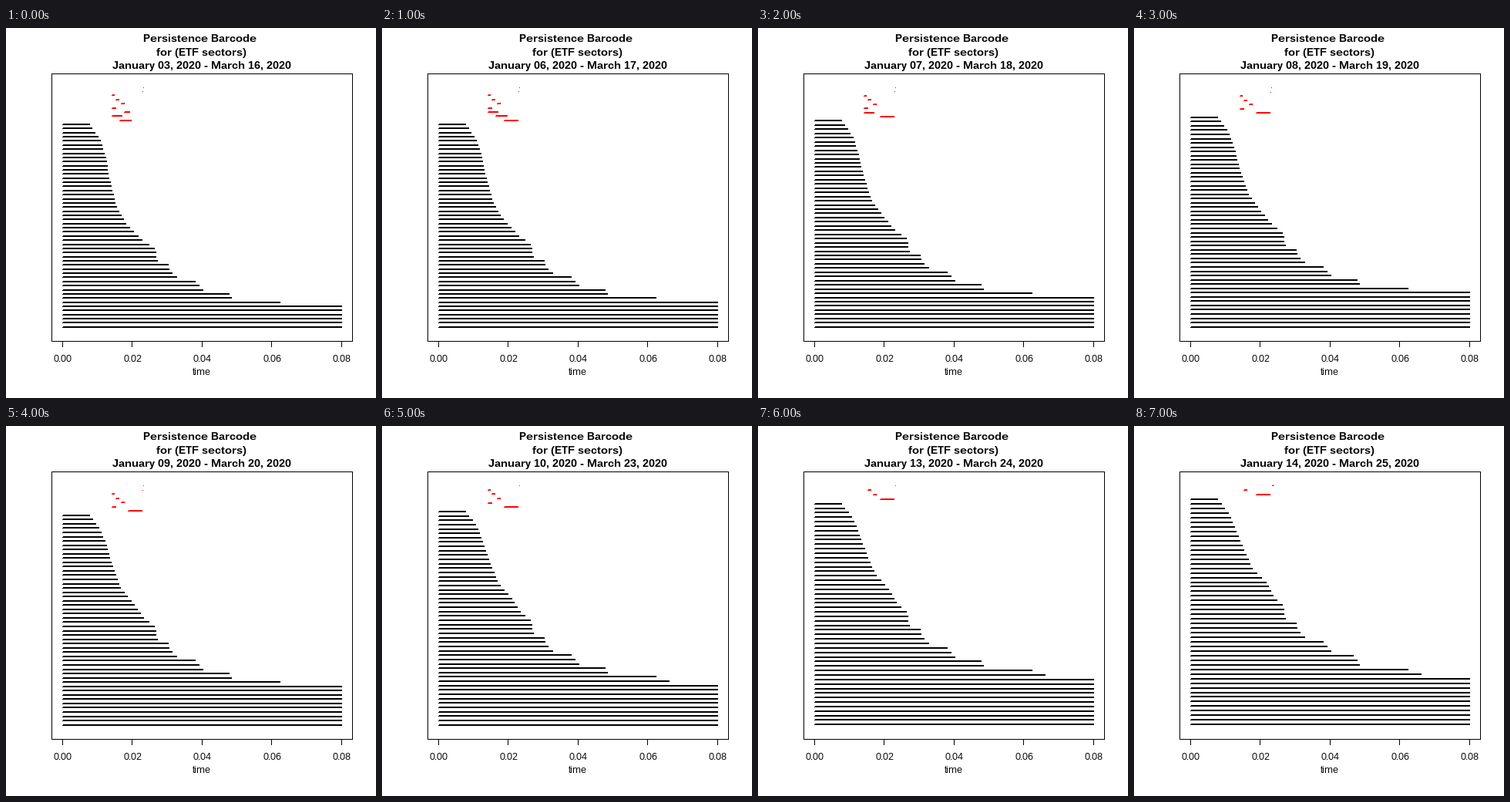
Write a matplotlib script that moves like this. It is 480x480 px and loops after 8000 ms.

```python
import numpy as np
import matplotlib.pyplot as plt
from matplotlib.animation import FuncAnimation
from matplotlib.collections import PolyCollection
from matplotlib.patches import Rectangle

SIZE = 480
PX = 0.75                      # points per pixel at 96 dpi
STEPS = 8
LEFT, RIGHT = 73, 436          # extent of a full-length bar
Y_ZERO, Y_SPAN = 393.69, 321.78
COMPONENTS = 50

plt.rcParams.update({
    "font.family": "Liberation Sans",
    "text.hinting": "native",
    "text.hinting_factor": 1,
})

# Evenly spaced quantiles of the short bars' right ends, first and last window.
SHORT_START = np.array([109, 123, 130, 133, 138, 144, 156, 177])
SHORT_STOP = np.array([109, 123, 131, 138, 146, 154, 172, 181])

# Right ends of the long bars, and of those that join at a later step.
LONG = [186, 193, 195, 195, 197, 211, 212, 216, 222,
        246, 251, 256, 290, 293, 356]
LATE = {373: 5, 285: 7}

# Loops from bottom to top: left, right, first step, last step.
LOOPS = [
    (158, 177, 1, 7), (147, 163, 0, 1), (137, 151, 0, 2), (153, 161, 0, 0),
    (137, 143, 0, 5), (149, 154, 0, 6), (142, 147, 0, 7), (137, 141, 0, 5),
    (179, 181, 7, 7), (177, 178, 0, 4), (178, 179, 0, 6),
]


def component_spans(step):
    """Bars from longest to shortest; short ones give way to full ones."""
    full = min(6 + step, 8 + step // 2)
    long = LONG + [end for end, first in LATE.items() if step >= first]
    count = COMPONENTS - full - len(long)
    keys = SHORT_START + (SHORT_STOP - SHORT_START) * step / (STEPS - 1)
    rank = np.linspace(0, len(keys) - 1, count)
    short = np.interp(rank, np.arange(len(keys)), keys).round()
    ends = [RIGHT] * full + long + list(short)
    return [(LEFT, end) for end in sorted(ends, reverse=True)]


def loop_spans(step):
    return [(x0, x1) for x0, x1, first, last in LOOPS if first <= step <= last]


def bar(x0, x1, y):
    """Two-pixel bar whose lower row starts one pixel further left."""
    return [(x0 + 1, y - 1), (x1, y - 1), (x1, y + 1),
            (x0, y + 1), (x0, y), (x0 + 1, y)]


fig = plt.figure(figsize=(5, 5), dpi=96, facecolor="white")
ax = fig.add_axes([0, 0, 1, 1])
ax.set_xlim(0, SIZE)
ax.set_ylim(SIZE, 0)
ax.axis("off")


def block(x, y, w, h):
    ax.add_patch(Rectangle((x, y), w, h, fc="black", lw=0, antialiased=False))


def label(x, y, text, px=12, weight="normal"):
    return ax.text(x, y, text, fontsize=px * PX, weight=weight,
                   ha="center", va="baseline", color="black")


# Plot frame, ticks and axis labels
for y in (59, 406):
    block(59, y, 391, 1)
for x in (59, 449):
    block(x, 59, 1, 348)
for i in range(5):
    x = 73.5 + 90.45 * i
    block(int(x), 406, 1, 8)
    label(x + 0.5, 433, f"{i * 0.02:.2f}")
label(254, 450, "time")

label(251.5, 18, "Persistence Barcode", 14, "bold")
label(253.5, 36, "for (ETF sectors)", 14, "bold")
dates = label(254, 53, "", 14, "bold")

bars = PolyCollection([], linewidths=0, antialiaseds=False)
ax.add_collection(bars, autolim=False)


def trading_day(first, step):
    """Two-digit day of the month, counting weekdays only."""
    return str(np.busday_offset(first, step))[-2:]


def update(step):
    start = trading_day("2020-01-03", step)
    stop = trading_day("2020-03-16", step)
    dates.set_text(f"January {start}, 2020 - March {stop}, 2020")

    components, loops = component_spans(step), loop_spans(step)
    spans = components + loops
    gap = Y_SPAN / (len(spans) + 1)
    bars.set_verts([bar(x0, x1, int(Y_ZERO - gap * (k + 1)))
                    for k, (x0, x1) in enumerate(spans)])
    bars.set_facecolor(["black"] * len(components) + ["red"] * len(loops))
    return bars, dates


anim = FuncAnimation(fig, update, frames=STEPS, interval=1000,
                     repeat=True, repeat_delay=0, blit=False)
plt.show()
```
